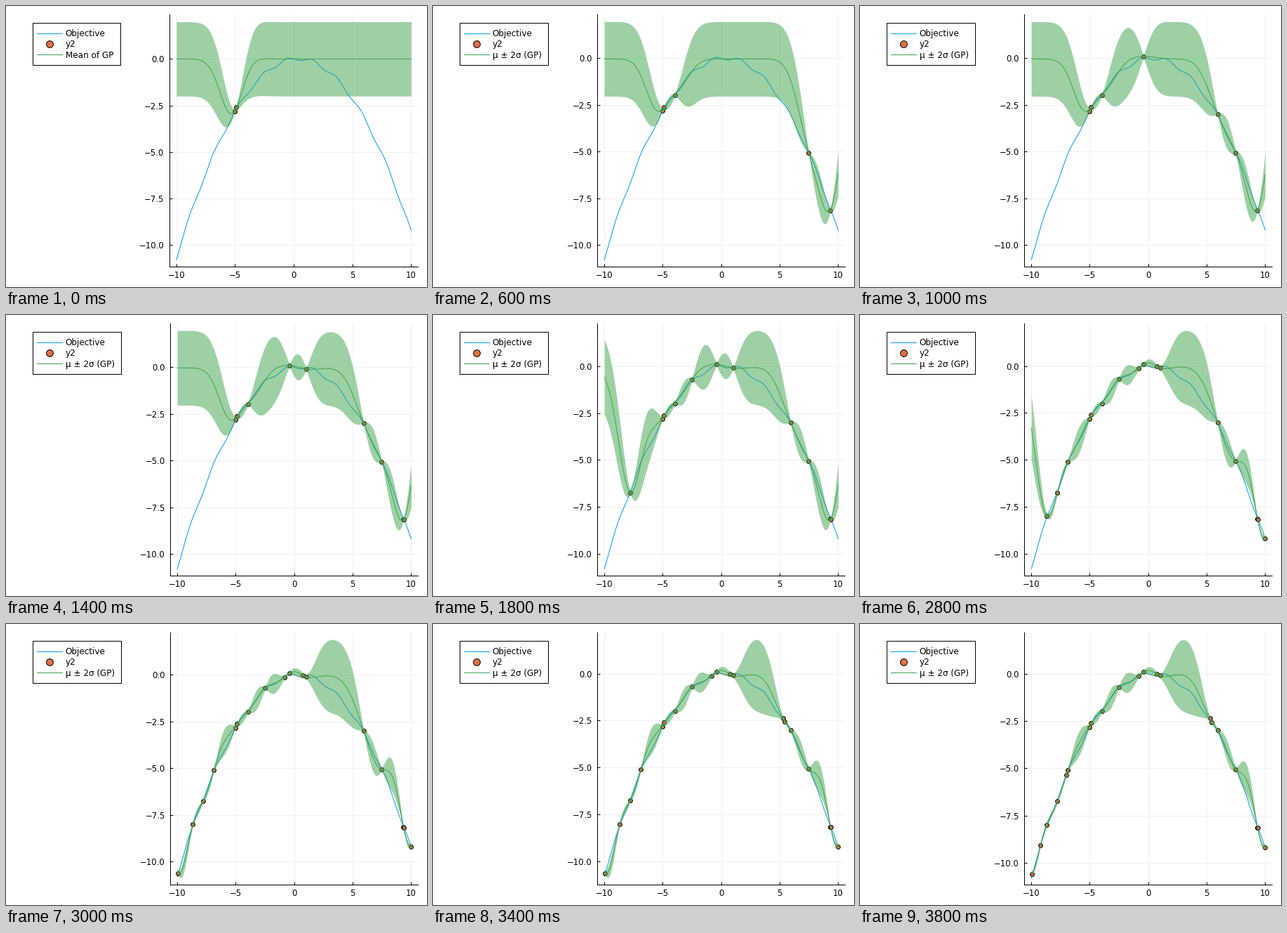
Recreate the animation shown at these times as a matplotlib script. Size 600x400 px, loop 4 s.

```python
import numpy as np
import matplotlib.pyplot as plt
from matplotlib.animation import FuncAnimation
from matplotlib.patches import Rectangle

W, H, DPI = 600, 400, 100
PX = 72 / DPI  # points per pixel
FRAMES, STEP = 20, 200
LEFT, RIGHT, TOP, BOTTOM = 234.2, 587.4, 12, 371.4
BLUE, ORANGE, GREEN, GRID = "#009AFA", "#E26F46", "#3DA44D", "#F0F0F0"
NOISE = 0.004

plt.rcParams["font.family"] = "DejaVu Sans"


def objective(x):
    return -0.1 * x**2 + 0.07 * x - 0.1 * np.sin(3 * x)


def observe(x):
    """Objective with a fast ripple that acts as measurement error."""
    return objective(x) + 0.07 * np.sin(10 * x)


# Places probed, in order; each step adds one.
PROBES = np.array([-5.03, -4.91, 7.48, -3.97, 9.34, 5.93, -0.41, 1.02, 9.36,
                   -2.5, -7.78, 0.74, 9.97, -8.68, -0.85, -6.88, -9.94,
                   5.27, 5.43, -9.25, -7.0])
GRID_X = np.linspace(-10, 10, 500)


def kernel(a, b):
    return np.exp(-0.5 * (a[:, None] - b[None, :]) ** 2)


def posterior(xs, prior):
    gram = kernel(xs, xs) + NOISE * np.eye(len(xs))
    cross = kernel(GRID_X, xs)
    mean = prior + cross @ np.linalg.solve(gram, observe(xs) - prior)
    var = 1 - np.sum(cross * np.linalg.solve(gram, cross.T).T, axis=1)
    return mean, np.sqrt(np.maximum(var, 0))


def widen(lo, hi):
    pad = 0.03 * (hi - lo)
    return lo - pad, hi + pad


fig = plt.figure(figsize=(W / DPI, H / DPI), dpi=DPI, facecolor="white")
ax = fig.add_axes([0, 0, 1, 1])
page = fig.add_axes([0, 0, 1, 1])


def draw_legend(label, shift):
    page.cla()
    page.set(xlim=(0, W), ylim=(H, 0))
    page.axis("off")
    page.add_patch(Rectangle((38, 23.5), 126.3 + shift, 60.5, fc="white",
                             ec="black", lw=PX))
    rows = (39, "Objective"), (54, "y2"), (69.4, label)
    for y, text in rows:
        page.text(84.8, y + 4.3, text, fontsize=12 * PX, va="baseline")
    for (y, _), color in zip(rows[::2], (BLUE, GREEN)):
        page.plot([44, 79.5], [y, y], color=color, lw=PX)
    page.plot([62], [54], "o", ms=9.8 * PX, mfc=ORANGE, mec="black", mew=PX)


def draw_plot(xs, prior, left):
    mean, sd = posterior(xs, prior)
    low, high = mean - 2 * sd, mean + 2 * sd
    curve = objective(GRID_X)

    ax.cla()
    ax.set_position([left / W, 1 - BOTTOM / H,
                     (RIGHT - left) / W, (BOTTOM - TOP) / H])
    ax.set_xlim(widen(-10, 10))
    ax.set_ylim(widen(min(curve.min(), low.min()), high.max()))
    ax.set_xticks(range(-10, 11, 5))
    ax.set_yticks(np.arange(-10, 1, 2.5))
    ax.yaxis.set_major_formatter(lambda v, _: f"{v:.1f}".replace("-", "−"))
    ax.tick_params(direction="in", length=4 * PX, width=PX,
                   labelsize=11.6 * PX)
    ax.tick_params(axis="x", pad=5.8 * PX)
    ax.tick_params(axis="y", pad=7.3 * PX)
    ax.set_axisbelow(True)
    ax.grid(color=GRID, lw=PX)
    ax.spines[["top", "right"]].set_visible(False)
    ax.spines[["left", "bottom"]].set_linewidth(PX)

    ax.plot(GRID_X, curve, color=BLUE, lw=PX, zorder=2)
    ax.plot(xs, observe(xs), "o", ms=5.8 * PX, mfc=ORANGE, mec="black",
            mew=PX, zorder=3)
    ax.fill_between(GRID_X, low, high, color=GREEN, alpha=0.5, lw=0, zorder=4)
    ax.plot(GRID_X, mean, color=GREEN, lw=PX, zorder=5)


def draw(i):
    first = i == 0
    shift = -1.4 if first else 0  # the shorter label narrows the legend
    draw_legend("Mean of GP" if first else "µ ± 2σ (GP)", shift)
    draw_plot(PROBES[:i + 2], 0 if first else -0.035, LEFT + shift)
    return []


anim = FuncAnimation(fig, draw, frames=FRAMES, interval=STEP, repeat=True,
                     repeat_delay=0, init_func=lambda: draw(0))
plt.show()
```
